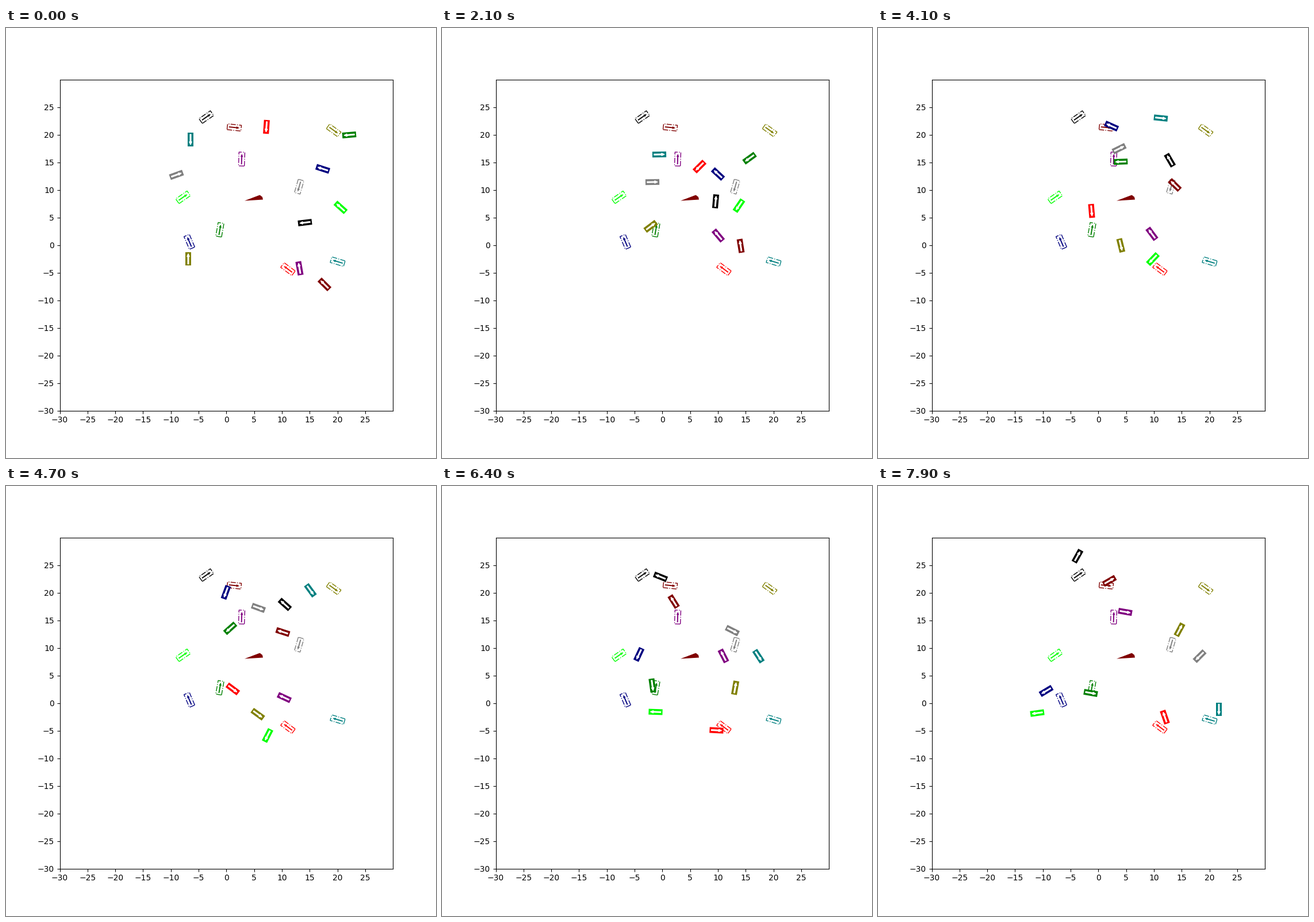
These frames come from a looping animation (748x748 px, 8000 ms). A matplotlib script:

```python
import numpy as np
import matplotlib.pyplot as plt
from matplotlib.animation import FuncAnimation
from matplotlib.patches import Polygon

SIZE, DPI, FRAMES, STEP = 748, 100, 80, 100
TIMES = [0, 12, 20, 33, 46, 63, 78]
PIVOT = 0.5  # rear axle to centre of the body
LENGTH, WIDTH = 2.5, 1.05

BODY = np.array([(-1, -1), (1, -1), (1, 1), (-1, 1)]) * (LENGTH / 2, WIDTH / 2)


def arrow_shape(tail, tip, shaft, head, head_len):
    neck = tip - head_len
    return np.array([(tail, -shaft), (neck, -shaft), (neck, -head), (tip, 0),
                     (neck, head), (neck, shaft), (tail, shaft)])


ARROW = arrow_shape(-0.95, 0.95, 0.1, 0.24, 0.55)


def to_data(x, y):
    """Stage pixels to axes units."""
    return np.array([(x / SIZE - 0.125) / 0.775 * 60 - 30,
                     (1 - y / SIZE - 0.11) / 0.77 * 60 - 30])


def unit(angle):
    return np.array([np.cos(angle), np.sin(angle)])


def place(shape, centre, angle):
    c, s = np.cos(angle), np.sin(angle)
    return shape @ np.array([(c, s), (-s, c)]) + centre


def wrap(angle):
    return (angle + np.pi) % (2 * np.pi) - np.pi


class Leg:
    """Smooth drive between two poses, forward (+1) or reverse (-1)."""

    def __init__(self, t0, t1, p0, p1, a0, a1, sign):
        self.t0, self.span, self.sign = t0, t1 - t0, sign
        self.p0, self.p1 = p0, p1
        chord = (p1 - p0) * sign
        course = np.arctan2(chord[1], chord[0])
        bend = wrap(a0 - course) ** 2 + wrap(a1 - course) ** 2
        length = np.hypot(*chord) * (1 + bend / 10)
        self.m0, self.m1 = (sign * length * unit(a) for a in (a0, a1))
        self.speed = length / self.span
        self.d0 = self.d1 = 1

    def pose(self, t):
        u = (t - self.t0) / self.span
        s = (self.d0 * (u**3 - 2 * u**2 + u) + self.d1 * (u**3 - u**2)
             + 3 * u**2 - 2 * u**3)
        delta = self.p1 - self.p0
        pos = (self.p0 + delta * (3 * s**2 - 2 * s**3)
               + self.m0 * (s**3 - 2 * s**2 + s) + self.m1 * (s**3 - s**2))
        vel = self.sign * (delta * 6 * (s - s**2)
                           + self.m0 * (3 * s**2 - 4 * s + 1)
                           + self.m1 * (3 * s**2 - 2 * s))
        return pos, np.arctan2(vel[1], vel[0])


class Car:
    def __init__(self, color, goal, xs, ys, angles, times=TIMES, reverse=()):
        self.color, self.goal = color, goal
        angles = np.radians(angles)
        points = [to_data(x, y) - PIVOT * unit(a)
                  for x, y, a in zip(xs, ys, angles)]
        self.legs = [Leg(times[i], times[i + 1], points[i], points[i + 1],
                         angles[i], angles[i + 1], -1 if i in reverse else 1)
                     for i in range(len(times) - 1)]
        self.legs[0].d0 = 0
        for a, b in zip(self.legs, self.legs[1:]):
            v = min((a.speed + b.speed) / 2, 2 * min(a.speed, b.speed))
            v *= a.sign == b.sign
            a.d1, b.d0 = v / a.speed, v / b.speed

    def build(self, ax):
        x, y, deg = self.goal
        centre, angle = to_data(x, y), np.radians(deg)
        ax.add_patch(Polygon(place(BODY, centre, angle), fill=False,
                             ec=self.color, ls='-.', lw=1))
        ax.add_patch(Polygon(place(ARROW, centre, angle), color=self.color, lw=0))
        self.body = ax.add_patch(Polygon(BODY, fc=self.color, lw=0, zorder=2))
        self.arrow = ax.add_patch(Polygon(ARROW, fc='white', ec='white',
                                          lw=0.8, zorder=2.1))

    def move(self, t):
        leg = [g for g in self.legs if g.t0 <= t][-1]
        pos, angle = leg.pose(t)
        centre = pos + PIVOT * unit(angle)
        self.body.set_xy(place(BODY, centre, angle))
        self.arrow.set_xy(place(ARROW, centre, angle))


cars = [
    Car('black', (348.5, 155, 35),
        [520, 494.5, 476, 516, 485, 380, 347],
        [338.5, 327, 301.5, 260, 206, 158, 122],
        [187, 140, 85, 70, 138, 158, 61]),
    Car('maroon', (397, 173, -6),
        [554, 539, 519.5, 545.5, 481.5, 403, 402.5],
        [446, 421, 379, 311.5, 254, 201, 165],
        [135, 116, 99, 117, 162, 122, 30]),
    Car('olive', (570, 178, -36),
        [317, 331, 363, 419, 438, 510, 524.5],
        [401.5, 377.5, 345, 348, 397, 351, 250],
        [90, 44, 37, -91, -36, 80, 62]),
    Car('purple', (410, 228, 88),
        [510.5, 500, 480.5, 466, 484, 489.5, 430],
        [418, 391, 361, 346, 368, 295.5, 219],
        [100, 120, 130, 137, 155, 117, -10], reverse=(3,)),
    Car('gray', (510, 276, -106),
        [296.5, 323, 366, 400, 439, 505, 559.5],
        [255.5, 260, 268, 224, 212, 251.5, 296],
        [20, -26, 1, 54, -20, -27, -135]),
    Car('lime', (308, 294.5, 35),
        [582, 556, 516.5, 507, 455, 371.5, 277],
        [312, 300, 309, 369, 434, 393, 395],
        [138, 175, 236, 240, 243, 178, 188]),
    Car('green', (372, 351, 80),
        [597, 571.5, 535, 465.5, 390, 366, 376, 370],
        [186, 199.5, 226.5, 236, 247.5, 347, 372, 360],
        [185, 216, 216, 172, 222, -82, -50, -10],
        times=TIMES[:6] + [71, 78], reverse=(6,)),
    Car('navy', (319, 372, 113),
        [551, 522.5, 480, 443.5, 382.5, 342.5, 292.5],
        [245, 249, 254, 198, 185, 293, 356.5],
        [162, 203, 137, 130, 250, 245, 211]),
    Car('red', (490.5, 419.5, 143),
        [453, 453, 448, 385, 394.5, 477.5, 499],
        [172, 200.5, 241, 275.5, 353, 425, 402],
        [-94, -88, -135, -147, -37, -3, 109]),
    Car('teal', (577, 406.5, 163),
        [321, 335, 378, 439.5, 529.5, 550.5, 593],
        [194, 216, 220, 168, 181.5, 296, 388.5],
        [-90, -18, 1, 39, -54, -57, -90]),
]

fig, ax = plt.subplots(figsize=(SIZE / DPI, SIZE / DPI), dpi=DPI)
ax.set_xlim(-30, 30)
ax.set_ylim(-30, 30)
ax.set_xticks(range(-30, 30, 5))
ax.set_yticks(range(-30, 30, 5))

block = [(415, 300.5), (441.5, 290.5), (446, 294), (447, 298.5)]
ax.add_patch(Polygon([to_data(x, y) for x, y in block], color='maroon', lw=0))
for car in cars:
    car.build(ax)


def draw(frame):
    for car in cars:
        car.move(max(frame - 1, 0))
    return []


anim = FuncAnimation(fig, draw, frames=FRAMES, interval=STEP,
                     init_func=lambda: draw(0), repeat=True, repeat_delay=0)
plt.show()
```
